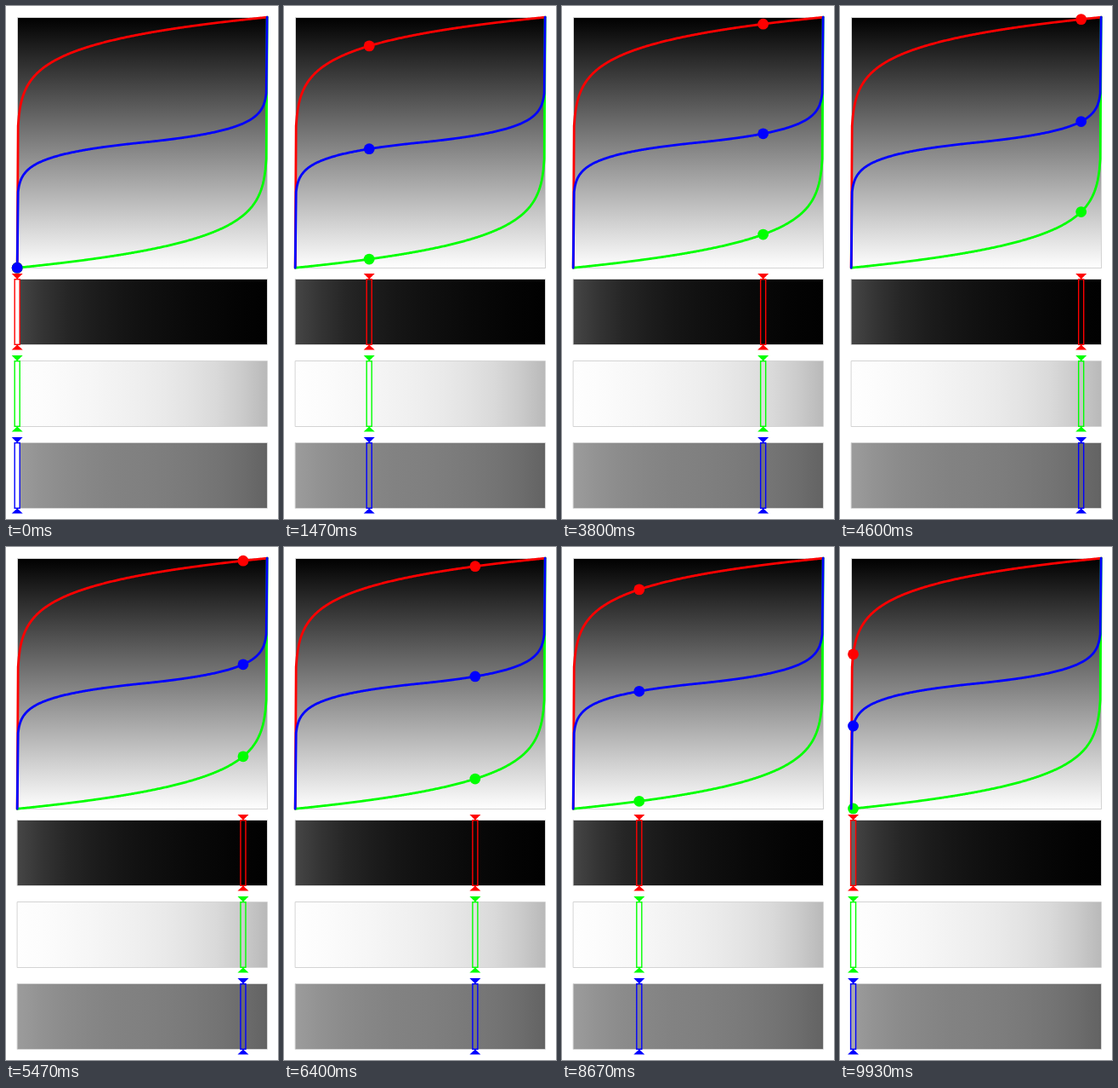
An HTML page with a canvas for the animation above (9.99 s loop, 320 by 602 pixels).

```html
<!DOCTYPE html>
<html lang="en">
<head>
<meta charset="utf-8">
<title>Transfer curves</title>
<style>
  html, body { margin: 0; width: 100%; height: 100%; overflow: hidden; background: #fff; }
  canvas { display: block; }
</style>
</head>
<body>
<canvas id="stage" width="320" height="602"></canvas>
<script>
const ctx = document.getElementById('stage').getContext('2d');

const LOOP = 9990;
const LEFT = 13, BOTTOM = 307, SIZE = 294;
const BAR_HEIGHT = 76;
const POWER = 0.1;

const rise = u => Math.pow(u, POWER);
const fall = u => 1 - rise(1 - u);
const both = u => u < 0.5 ? rise(2 * u) / 2 : 0.5 + fall(2 * u - 1) / 2;

const channels = [
  { color: '#f00', curve: rise, barTop: 321 },
  { color: '#0f0', curve: fall, barTop: 417 },
  { color: '#00f', curve: both, barTop: 513 }
];

const toX = u => LEFT + 0.2 + SIZE * u;
const toY = v => BOTTOM + 0.2 - SIZE * v;

function gray(v) {
  const level = Math.round(255 * (1 - v));
  return `rgb(${level},${level},${level})`;
}

function framedBox(x, y, w, h, fill) {
  ctx.fillStyle = fill;
  ctx.fillRect(x, y, w, h);
  ctx.strokeStyle = '#d4d4d4';
  ctx.lineWidth = 1;
  ctx.strokeRect(x + 0.5, y + 0.5, w, h);
}

function drawBackdrop() {
  const shade = ctx.createLinearGradient(0, 13, 0, 308);
  shade.addColorStop(0, '#000');
  shade.addColorStop(1, '#fff');
  framedBox(LEFT, 13, SIZE, SIZE, shade);
}

function drawCurve({ color, curve }) {
  ctx.beginPath();
  for (let i = 0; i <= SIZE; i++) {
    const u = i / SIZE;
    ctx.lineTo(toX(u), toY(curve(u)));
  }
  ctx.strokeStyle = color;
  ctx.lineWidth = 2.8;
  ctx.lineJoin = 'round';
  ctx.lineCap = 'round';
  ctx.stroke();
}

function drawDot({ color, curve }, u) {
  ctx.fillStyle = color;
  ctx.beginPath();
  ctx.arc(toX(u), toY(curve(u)), 6.4, 0, 2 * Math.PI);
  ctx.fill();
}

function drawBar({ curve, barTop }) {
  const shade = ctx.createLinearGradient(LEFT, 0, LEFT + SIZE, 0);
  for (let i = 0; i <= 10; i++) {
    const u = Math.min(0.96, Math.max(0.04, i / 10));
    shade.addColorStop(i / 10, gray(curve(u)));
  }
  framedBox(LEFT, barTop - 1, SIZE, BAR_HEIGHT + 1, shade);
}

function arrow(x, tipY, baseY) {
  ctx.beginPath();
  ctx.moveTo(x - 6.5, baseY);
  ctx.lineTo(x + 6.5, baseY);
  ctx.lineTo(x, tipY);
  ctx.fill();
}

function drawMarker({ color, curve, barTop }, u) {
  const x = toX(u);
  const bottom = barTop + BAR_HEIGHT;
  ctx.fillStyle = gray(curve(u));
  ctx.fillRect(x - 3, barTop, 6, BAR_HEIGHT);
  ctx.strokeStyle = color;
  ctx.lineWidth = 1.4;
  ctx.lineJoin = 'miter';
  ctx.strokeRect(x - 3, barTop - 0.3, 6, BAR_HEIGHT + 0.6);
  ctx.fillStyle = color;
  arrow(x, barTop - 0.5, barTop - 7);
  arrow(x, bottom + 0.5, bottom + 6.5);
}

// 15 pictures a second, each taken from a 25-per-second sweep.
function sweep(ms) {
  const step = Math.floor((Math.floor(ms / 10) * 10 + 5) * 0.015);
  const tick = Math.ceil(step * 5 / 3 - 1e-6);
  return 1 - Math.abs(1 - tick / 125);
}

function draw(ms) {
  const u = sweep(ms % LOOP);
  ctx.fillStyle = '#fff';
  ctx.fillRect(0, 0, 320, 602);
  drawBackdrop();
  for (const channel of channels) {
    drawCurve(channel);
    drawDot(channel, u);
    drawBar(channel);
    drawMarker(channel, u);
  }
}

const start = performance.now();
function tick() {
  draw(performance.now() - start);
  requestAnimationFrame(tick);
}
tick();
</script>
</body>
</html>
```
